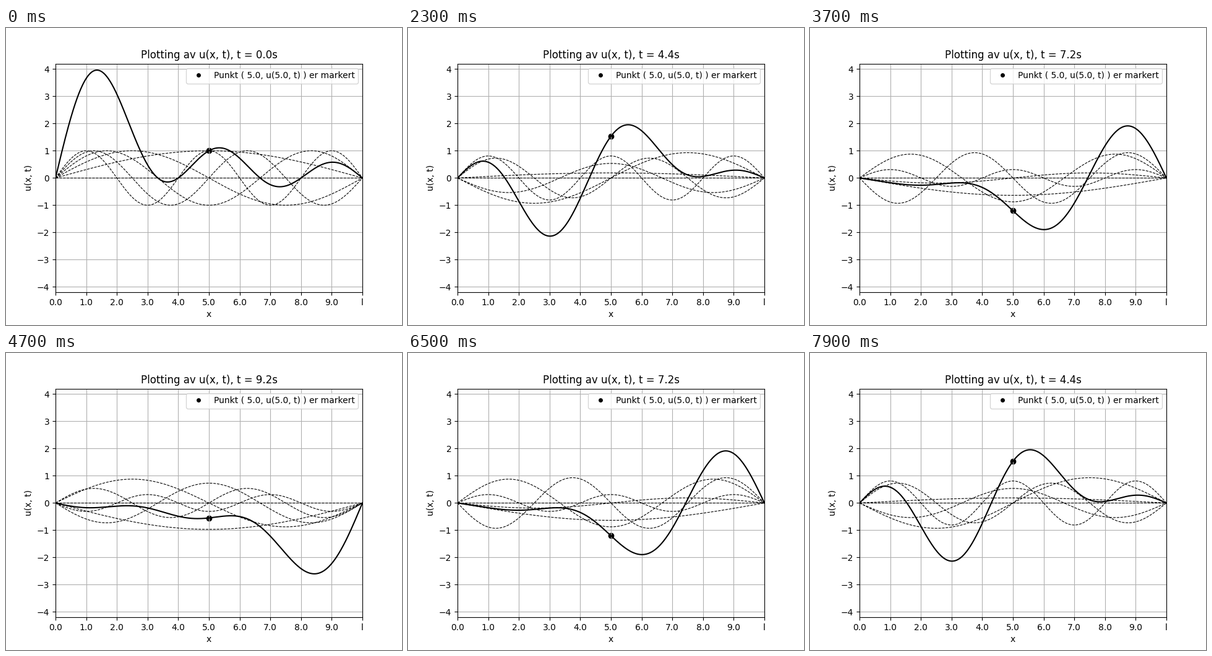
Write a matplotlib script that moves like this. It is 640x480 px and loops after 8000 ms.

```python
import numpy as np
import matplotlib.pyplot as plt
from matplotlib.animation import FuncAnimation
from matplotlib.lines import Line2D

LENGTH = 10.0
MODES = range(6)
POINT = 5.0
DT = 0.2
FRAMES = 80
INTERVAL = 100

x = np.linspace(0, LENGTH, 500)


def mode(n, x, t):
    """Standing wave number n on a string fixed at both ends."""
    return np.sin(n * np.pi * x / LENGTH) * np.cos(n * np.pi * t / LENGTH)


def u(x, t):
    return sum(mode(n, x, t) for n in MODES)


def time_at(frame):
    """The first state is held for two frames; time turns back at t = 10."""
    step = max(frame - 1, 0)
    return LENGTH - abs(LENGTH - DT * step)


fig, ax = plt.subplots(figsize=(6.4, 4.8), dpi=100)
ax.set_xlim(0, LENGTH)
ax.set_ylim(-4.2, 4.2)
ticks = np.arange(0, LENGTH + 1)
ax.set_xticks(ticks, [f"{v:.1f}" for v in ticks[:-1]] + ["l"])
ax.set_xlabel("x")
ax.set_ylabel("u(x, t)")
ax.grid(True)
title = ax.set_title("")

waves = [ax.plot(x, 0 * x, "k--", lw=0.8)[0] for _ in MODES]
total, = ax.plot(x, 0 * x, "k-", lw=1.5)
dot = ax.scatter([POINT], [0], color="black")

handle = Line2D([0], [0], marker="o", color="white", markerfacecolor="black",
                label=f"Punkt ( {POINT}, u({POINT}, t) ) er markert")
ax.legend(handles=[handle], loc="upper right")


def update(frame):
    t = time_at(frame)
    for n, wave in zip(MODES, waves):
        wave.set_ydata(mode(n, x, t))
    total.set_ydata(u(x, t))
    dot.set_offsets([[POINT, u(POINT, t)]])
    title.set_text(f"Plotting av u(x, t), t = {t:.1f}s")
    return [*waves, total, dot, title]


anim = FuncAnimation(fig, update, frames=FRAMES, interval=INTERVAL,
                     repeat=True, repeat_delay=0, blit=False)
plt.show()
```
